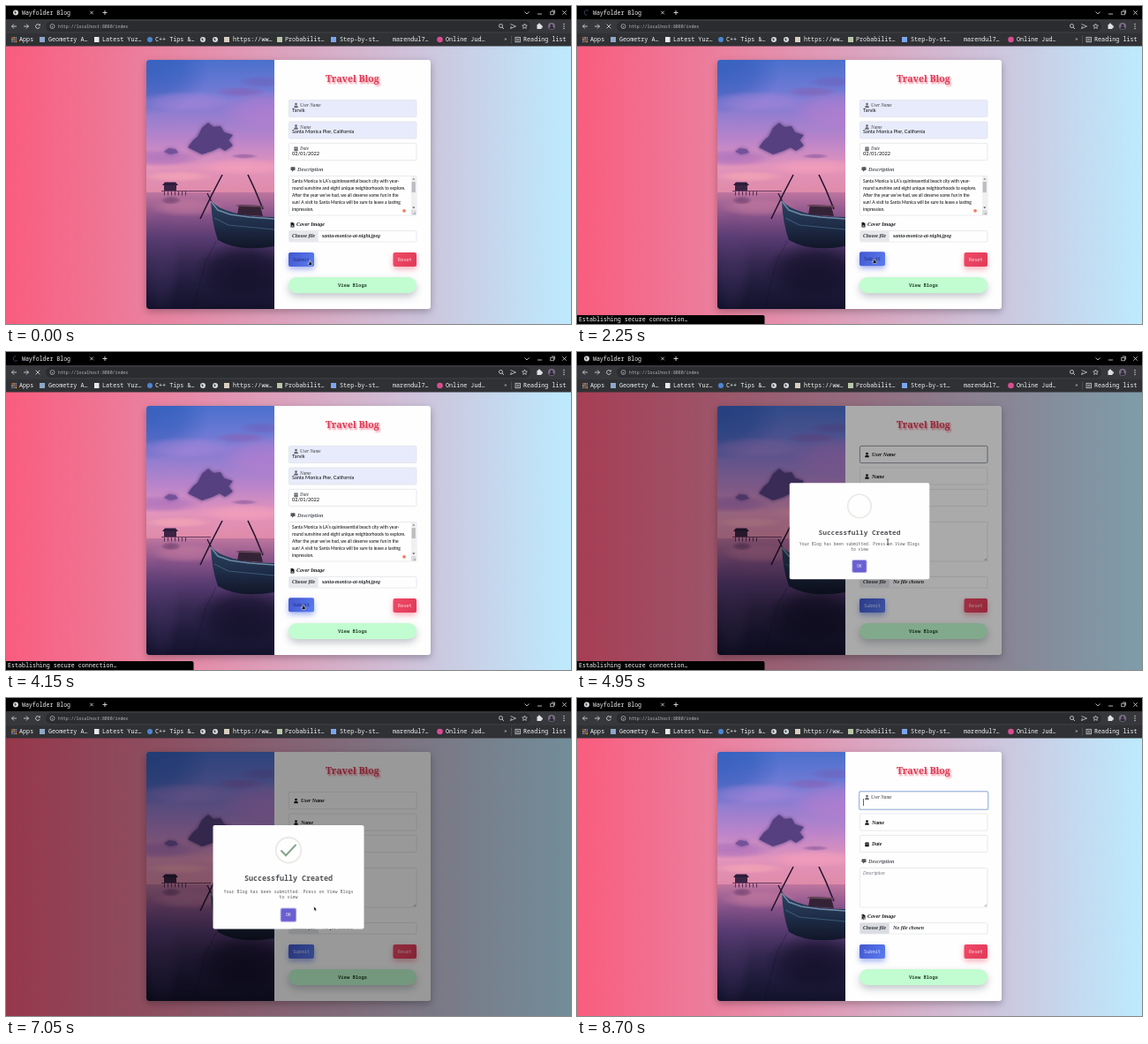
Write an HTML page with a canvas that moves like this. It is 640 px wide and 360 px high and loops after 8750 ms.

```html
<!DOCTYPE html>
<html lang="en">
<head>
<meta charset="utf-8">
<title>Travel Blog form</title>
<style>
html, body { margin: 0; width: 100%; height: 100%; overflow: hidden; background: #000; }
canvas { display: block; width: 640px; height: 360px; }
</style>
</head>
<body>
<canvas id="stage"></canvas>
<script>
const LOOP = 8750, LOAD = 1950, OPEN = 4870, STATUS_END = 5250, CLOSE = 7882, FOCUS = 8220;
const MONO = '"Noto Sans Mono", monospace';
const SCRIPT = '"Liberation Serif", serif';
const SANS = 'Lato, sans-serif';

const canvas = document.getElementById('stage');
const dpr = window.devicePixelRatio || 1;
canvas.width = 640 * dpr;
canvas.height = 360 * dpr;
const g = canvas.getContext('2d');

const clamp = (v, a = 0, b = 1) => Math.min(b, Math.max(a, v));
const part = (t, from, len) => clamp((t - from) / len);
const lerp = (a, b, k) => a + (b - a) * k;
const ease = k => k * k * (3 - 2 * k);

function rect(x, y, w, h, fill) {
  g.fillStyle = fill;
  g.fillRect(x, y, w, h);
}
function box(x, y, w, h, r, fill, line, lw = 0.7) {
  g.beginPath();
  g.roundRect(x, y, w, h, r);
  if (fill) { g.fillStyle = fill; g.fill(); }
  if (line) { g.strokeStyle = line; g.lineWidth = lw; g.stroke(); }
}
function dot(x, y, r, fill) {
  g.beginPath();
  g.arc(x, y, r, 0, 7);
  g.fillStyle = fill;
  g.fill();
}
function path(pts, line, lw = 1, fill) {
  g.beginPath();
  for (let i = 0; i < pts.length; i += 2) g.lineTo(pts[i], pts[i + 1]);
  if (fill) { g.closePath(); g.fillStyle = fill; g.fill(); }
  if (line) { g.strokeStyle = line; g.lineWidth = lw; g.stroke(); }
}
function arc(x, y, r, a, b, line, lw = 1) {
  g.beginPath();
  g.arc(x, y, r, a, b);
  g.strokeStyle = line;
  g.lineWidth = lw;
  g.stroke();
}
function text(s, x, y, font, fill, align = 'left') {
  g.font = font;
  g.fillStyle = fill;
  g.textAlign = align;
  g.textBaseline = 'middle';
  g.fillText(s, x, y);
}
function grad(x0, y0, x1, y1, ...stops) {
  const gr = g.createLinearGradient(x0, y0, x1, y1);
  stops.forEach((c, i) => gr.addColorStop(i / (stops.length - 1), c));
  return gr;
}
function shadow(color, blur, dy, draw) {
  g.save();
  g.shadowColor = color;
  g.shadowBlur = blur * dpr;
  g.shadowOffsetY = dy * dpr;
  draw();
  g.restore();
}
function haze(x, y, rx, ry, rgb, alpha) {
  g.save();
  g.translate(x, y);
  g.scale(rx, ry);
  const gr = g.createRadialGradient(0, 0, 0, 0, 0, 1);
  gr.addColorStop(0, `rgba(${rgb},${alpha})`);
  gr.addColorStop(0.55, `rgba(${rgb},${alpha * 0.75})`);
  gr.addColorStop(1, `rgba(${rgb},0)`);
  dot(0, 0, 1, gr);
  g.restore();
}
function cloud(pts, color) {
  shadow(color, 4, 0, () => path(pts, null, 0, color));
}

function drawBrowser(t, loading) {
  const pale = '#dfe1e4';
  rect(0, 0, 640, 15, '#000');
  rect(0, 15, 640, 16, '#37383b');
  rect(0, 31, 640, 14.5, '#303134');
  box(45, 17, 549, 12, 6, '#2b2c2f');

  if (loading) {
    const a = t / 160;
    arc(11, 7.5, 2.8, a, a + 4, '#34405a', 1);
  } else {
    globe(11, 7.5);
  }
  text('Wayfolder Blog', 18, 7.8, '500 6.55px ' + MONO, '#f2f2f2');
  cross(97, 7.5, 1.8, pale);
  path([109.5, 7.5, 114.5, 7.5], pale, 0.9);
  path([112, 5, 112, 10], pale, 0.9);
  path([587.5, 6.5, 590, 9, 592.5, 6.5], pale, 0.8);
  path([602, 9, 607, 9], pale, 0.8);
  g.strokeStyle = pale;
  g.lineWidth = 0.7;
  g.strokeRect(616.8, 6.2, 3.6, 3.6);
  path([618, 5, 621.6, 5, 621.6, 8.6], pale, 0.7);
  cross(632.5, 7.5, 2.2, pale);

  path([12, 23, 6.5, 23], pale, 0.8);
  path([9, 20.5, 6.5, 23, 9, 25.5], pale, 0.8);
  path([20, 23, 25.5, 23], pale, 0.8);
  path([23, 20.5, 25.5, 23, 23, 25.5], pale, 0.8);
  if (loading) {
    cross(36, 23, 2.4, pale);
  } else {
    arc(36, 23, 2.4, 0.3, 5.4, pale, 0.8);
    path([36.6, 22.3, 38.7, 22.3, 38.7, 20.1], null, 0, pale);
  }
  arc(52.5, 23, 2.5, 0, 7, '#bfc2c6', 0.7);
  path([52.5, 22.6, 52.5, 24.5], '#bfc2c6', 0.7);
  text('http://localhost:8080/index', 59, 23.2, '4.9px ' + MONO, '#b4b7bc');
  arc(560.5, 22.5, 2, 0, 7, pale, 0.8);
  path([562, 24, 564, 26], pale, 0.8);
  path([571.5, 20.5, 577.5, 23, 571.5, 25.5, 572.5, 23], pale, 0.7);
  const star = [];
  for (let i = 0; i < 11; i++) {
    const r = i % 2 ? 1.4 : 3, a = i * Math.PI / 5 - Math.PI / 2;
    star.push(587.5 + r * Math.cos(a), 23 + r * Math.sin(a));
  }
  path(star, pale, 0.7);
  rect(601.5, 21, 5, 5, pale);
  dot(604, 20.6, 1.2, pale);
  dot(606.8, 23.5, 1.2, pale);
  dot(618, 23, 4, '#7b6d86');
  dot(618, 22, 1.5, '#2c2735');
  box(615.5, 23.6, 5, 2.6, 1.3, '#2c2735');
  [20.5, 23, 25.5].forEach(y => dot(632, y, 0.7, pale));

  const hues = ['#e06055', '#e8b93f', '#5b9cf0'];
  for (let i = 0; i < 9; i++)
    rect(6.2 + (i % 3) * 2.2, 35.2 + Math.floor(i / 3) * 2.2, 1.5, 1.5, hues[(i + Math.floor(i / 3)) % 3]);
  box(38, 35, 6, 6, 0, '#8da7c9');
  box(100, 35, 5.5, 6, 0, '#e9e9e9');
  dot(163, 38, 3, '#4b86d0');
  globe(223, 38);
  globe(237, 38);
  box(247, 35, 6, 6, 0, '#d9cfc0');
  box(307, 35, 6, 6, 0, '#b9c7a8');
  box(368, 35, 6, 6, 0, '#7ba6ef');
  dot(491.5, 38, 3.3, '#d94d92');
  const marks = [[15, 'Apps'], [48, 'Geometry A…'], [109, 'Latest Yuz…'], [169, 'C++ Tips &…'],
    [257, 'https://ww…'], [316, 'Probabilit…'], [378, 'Step-by-st…'], [438, 'marendul7…'],
    [498, 'Online Jud…'], [586, 'Reading list']];
  marks.forEach(([x, s]) => text(s, x, 38.2, '500 6.75px ' + MONO, '#f2f3f4'));
  text('»', 564, 37.5, '6px ' + MONO, pale);
  rect(572, 33.5, 0.6, 9, '#5d5f64');
  g.strokeStyle = pale;
  g.lineWidth = 0.7;
  g.strokeRect(577, 35.3, 5.5, 5.5);
  path([578.2, 37.3, 581.4, 37.3], pale, 0.7);
  path([578.2, 39, 581.4, 39], pale, 0.7);
}
function globe(x, y) {
  dot(x, y, 3, '#d5d8dc');
  path([x - 1.8, y - 1, x, y - 1.4, x + 0.6, y + 0.6, x - 0.6, y + 1.6], null, 0, '#44474d');
}
function cross(x, y, r, c) {
  path([x - r, y - r, x + r, y + r], c, 0.8);
  path([x + r, y - r, x - r, y + r], c, 0.8);
}

function drawSunset() {
  g.save();
  g.beginPath();
  g.roundRect(159, 61, 145, 282, [3, 0, 0, 3]);
  g.clip();
  rect(159, 61, 145, 152, grad(0, 61, 0, 213, '#4a70cc', '#6b79d4', '#917dd0', '#bb84ca', '#e294bb', '#df8aa8'));
  haze(160, 75, 70, 48, '40,86,180', 0.6);
  haze(300, 118, 60, 24, '200,126,208', 0.5);
  haze(205, 108, 60, 12, '176,136,220', 0.5);
  haze(266, 97, 30, 6, '140,88,172', 0.5);
  haze(290, 86, 28, 7, '112,90,180', 0.5);
  haze(175, 172, 50, 10, '160,104,186', 0.6);
  haze(270, 182, 55, 10, '250,162,186', 0.6);
  haze(195, 193, 40, 6, '250,172,182', 0.6);
  cloud([206, 160, 212, 152, 217, 148, 222, 138, 229, 132, 235, 137, 243, 136, 247, 143, 257, 146,
    252, 152, 257, 158, 248, 164, 242, 160, 234, 164, 222, 168, 214, 164], '#56407f');
  cloud([179, 165, 184, 161, 192, 162, 195, 166, 186, 168], '#74529a');
  haze(270, 170, 16, 3, '128,80,150', 0.6);

  rect(159, 211, 145, 132, grad(0, 211, 0, 343, '#bd759f', '#875389', '#563a70', '#352850', '#1f1b3b', '#13122b'));
  haze(206, 228, 44, 11, '215,134,166', 0.45);
  haze(176, 290, 22, 60, '92,64,124', 0.25);
  haze(270, 300, 58, 34, '16,14,38', 0.75);

  // hut on stilts
  path([177, 203, 180, 199.5, 192, 199.5, 195, 203], null, 0, '#2c1c3c');
  rect(179, 203, 14, 6, '#3b2444');
  rect(176, 209, 56, 0.9, '#56305a');
  for (let x = 179; x < 206; x += 4) rect(x, 210, 0.8, 4.5, '#3b2444');
  haze(187, 220, 12, 5, '80,42,90', 0.5);

  path([245, 191, 233, 214, 220, 241], '#25152f', 1.6);
  path([228, 212, 242, 240], '#25152f', 1.2);
  path([274, 191, 282, 208, 291, 230], '#25152f', 1.6);

  g.beginPath();
  g.moveTo(232, 220);
  g.quadraticCurveTo(246, 238, 304, 239);
  g.lineTo(304, 272);
  g.quadraticCurveTo(264, 279, 240, 265);
  g.quadraticCurveTo(233, 246, 232, 220);
  g.fillStyle = grad(0, 220, 0, 276, '#2b4563', '#1f2d48', '#101426');
  g.fill();
  path([232, 221, 240, 231, 254, 236, 276, 239, 304, 241], '#6f8ba6', 1.5);
  path([236, 240, 252, 248, 304, 253], '#3a5876', 1.2);
  path([262, 236, 264, 225, 288, 226, 291, 238], null, 0, '#342337');
  path([261, 226, 292, 227], '#6d4a5b', 1.3);
  path([238, 266, 226, 290, 212, 343], 'rgba(20,14,36,.5)', 0.7);
  g.restore();
}

function personIcon(x, y, c) {
  dot(x, y - 1.5, 1.4, c);
  box(x - 2.3, y + 0.2, 4.6, 2.4, [1.6, 1.6, 0.4, 0.4], c);
}
function dateIcon(x, y, c) {
  box(x - 2.2, y - 1.8, 4.4, 4.4, 0.5, c);
  rect(x - 1.5, y - 2.6, 0.8, 1.2, c);
  rect(x + 0.7, y - 2.6, 0.8, 1.2, c);
  rect(x - 2.2, y - 0.7, 4.4, 0.4, '#fff');
}
function field(y, label, icon, value, up, fill) {
  box(320.4, y + 0.4, 144.6, 19.2, 1.5, fill, '#dfe1e6');
  const ly = lerp(y + 10.6, y + 6.6, up);
  const c = up > 0.5 ? '#6b6d74' : '#16171a';
  icon(328.5, ly, c);
  text(label, lerp(334, 333, up), ly + 0.2, `italic bold ${lerp(5.8, 5.1, up)}px ${SCRIPT}`, c);
  if (value) text(value, 324, y + 12.2, '5.6px ' + SANS, '#0b0b0d');
}
function button(x, y, w, h, r, fill, glow, label, color, size) {
  shadow(glow, 6, 3, () => box(x, y, w, h, r, fill));
  text(label, x + w / 2, y + h / 2 + 0.2, size + 'px ' + MONO, color, 'center');
}

const STORY = [
  'Santa Monica is LA’s quintessential beach city with year-',
  'round sunshine and eight unique neighborhoods to explore.',
  'After the year we’ve had, we all deserve some fun in the',
  'sun! A visit to Santa Monica will be sure to leave a lasting',
  'impression.'
];

function drawForm(t) {
  const filled = t < OPEN - 20;
  const focus = part(t, FOCUS, 100);
  const hover = t < 4250;
  shadow('rgba(0,0,0,.28)', 9, 3, () => box(159, 61, 322, 282, 3, '#fefefe'));
  drawSunset();

  g.save();
  g.shadowColor = 'rgba(240,60,90,.65)';
  g.shadowBlur = 2 * dpr;
  g.shadowOffsetX = 1.4 * dpr;
  g.shadowOffsetY = 1.6 * dpr;
  text('Travel Blog', 392.3, 82.9, '600 10.6px "Noto Serif", serif', '#dc3a54', 'center');
  g.restore();

  const up = filled ? 1 : 0, tint = filled ? '#e8ebfb' : '#fefefe';
  if (focus > 0) box(319.8, 105.8, 145.8, 20.4, 2, null, `rgba(165,190,228,${focus})`, 1.8);
  field(106, 'User Name', personIcon, filled && 'Tarvik', Math.max(up, focus), tint);
  const settle = filled ? 0 : 1 - part(t, OPEN + 150, 150);
  if (settle > 0) box(320.4, 106.4, 144.6, 19.2, 1.5, null, `rgba(150,155,168,${settle})`, 1);
  field(130.5, 'Name', personIcon, filled && 'Santa Monica Pier, California', up, tint);
  field(155, 'Date', dateIcon, filled && '02/01/2022', up, '#fefefe');
  if (t > FOCUS && (t - FOCUS) % 1000 < 500) rect(324, 114, 0.7, 8, '#222');

  box(322.5, 182.3, 5, 3.8, 0.6, '#55575d');
  path([324, 186, 324, 187.6, 326, 186], null, 0, '#55575d');
  text('Description', 330, 185, 'italic bold 6.2px ' + SCRIPT, '#55575d');
  box(320.4, 192.4, 144.6, 44.6, 1.5, '#fefefe', '#dfe1e6');
  if (filled) {
    STORY.forEach((s, i) => text(s, 324, 198.6 + i * 8, '500 4.93px ' + SANS, '#18191b'));
    rect(459, 193, 5.4, 38, '#f0f0f1');
    rect(459.6, 199, 4.2, 12, '#bcbdc0');
    path([460.3, 196.6, 463.3, 196.6, 461.8, 194.8], null, 0, '#77797d');
    path([460.3, 227.4, 463.3, 227.4, 461.8, 229.2], null, 0, '#44464a');
    rect(459, 231, 5.4, 5.6, '#dcdde0');
    dot(451, 231.8, 1.9, '#ef8069');
  } else {
    text('Description', 324, 198.8, 'italic 5.2px ' + SCRIPT, '#6f7278');
  }
  path([461.5, 236, 464, 233.5], '#777', 0.6);
  path([463, 236, 464, 235], '#777', 0.6);

  path([322.5, 245, 325, 245, 326.5, 246.5, 326.5, 250.5, 322.5, 250.5], null, 0, '#1b1c1f');
  path([323.2, 249.6, 324.3, 248, 325.8, 249.6], null, 0, '#fff');
  text('Cover Image', 329, 247.9, 'italic bold 6px ' + SCRIPT, '#1b1c1f');
  box(320.4, 254.4, 144.6, 12.6, 1.5, '#fefefe', '#dfe1e6');
  box(320.7, 254.7, 33, 12, [1, 0, 0, 1], t > CLOSE + 200 ? '#d9dce1' : '#e6e8ec');
  text('Choose file', 324, 260.8, 'italic bold 5.6px ' + SCRIPT, '#2a2c30');
  text(filled ? 'santa-monica-at-night.jpeg' : 'No file chosen', 358, 260.8, 'italic bold 5.9px ' + SCRIPT, '#2a2c30');

  const lift = hover && t > 600 ? 0.7 : 0;
  button(320, 279 - lift, 29, 16, 2, grad(320, 279, 349, 295, '#4257cf', '#5b7cf0'),
    'rgba(70,100,220,.5)', 'Submit', hover ? '#1f2c78' : '#d5dcff', 5.3);
  button(438.5, 279, 26.5, 16, 2, grad(438, 279, 465, 295, '#f04a68', '#e03a58'),
    'rgba(230,60,90,.4)', 'Reset', '#ffd9df', 5.3);
  shadow('rgba(120,130,140,.45)', 8, 4, () => box(320, 307, 145, 18, 9, '#c1fdd0'));
  text('View Blogs', 392.5, 316.2, 'bold 5.5px ' + MONO, '#28482f', 'center');
}

// pop-in overshoots, then settles
function popScale(k) {
  if (k < 0.45) return lerp(0.7, 1.05, ease(k / 0.45));
  if (k < 0.8) return lerp(1.05, 0.95, ease((k - 0.45) / 0.35));
  return lerp(0.95, 1, ease((k - 0.8) / 0.2));
}

function drawModal(t) {
  const fade = part(t, OPEN - 40, 145) * (1 - part(t, CLOSE - 10, 160));
  if (fade > 0) rect(0, 45, 640, 315, `rgba(0,0,0,${0.4 * fade})`);
  const out = part(t, CLOSE, 160);
  if (t < OPEN || out >= 1) return;
  const scale = popScale(part(t, OPEN, 300)) * (1 - 0.5 * out);
  g.save();
  g.globalAlpha = 1 - out;
  g.translate(320, 202.7);
  g.scale(scale, scale);
  g.translate(-320, -202.7);
  box(234.5, 144, 171, 117.5, 2, '#fefefe');
  arc(320, 172.3, 14.3, 0, 7, '#ece8e5', 1.8);
  const k = part(t, OPEN + 250, 350);
  if (k > 0) {
    const a = clamp(k / 0.35), b = part(k, 0.35, 0.65);
    g.lineCap = 'round';
    const tick = [312, 173, 312 + 5 * a, 173 + 5.2 * a];
    if (b > 0) tick.push(317 + 11 * b, 178.2 - 11.7 * b);
    path(tick, '#86a48d', 2);
    g.lineCap = 'butt';
  }
  text('Successfully Created', 320, 204.5, '600 8.35px ' + MONO, '#505256', 'center');
  text('Your Blog has been submitted. Press on View Blogs', 320, 219.2, '5px ' + MONO, '#5d5f63', 'center');
  text('to view', 320, 225.3, '5px ' + MONO, '#5d5f63', 'center');
  // the button dims once pressed
  if (out > 0) g.globalAlpha *= 0.5;
  box(310.6, 237.6, 18.6, 16.2, 2, '#b9b3ec');
  box(311.6, 238.6, 16.6, 14.2, 1.5, '#6a5fd0');
  text('OK', 320, 246, '5px ' + MONO, '#f0eeff', 'center');
  g.restore();
}

const MOVES = [[0, 344, 289], [50, 344, 289], [900, 336.5, 287], [4150, 336.5, 287],
  [4850, 352, 215], [5450, 352, 215], [6000, 348.8, 236], [7200, 348.8, 236], [7750, 322.6, 246]];

function drawCursor(t) {
  let i = MOVES.length - 1;
  while (MOVES[i][0] > t) i--;
  const a = MOVES[i], b = MOVES[i + 1] || a;
  const k = b === a ? 0 : ease((t - a[0]) / (b[0] - a[0]));
  const x = lerp(a[1], b[1], k), y = lerp(a[2], b[2], k);
  g.save();
  g.translate(x, y);
  if (t < 4250) {
    path([-0.6, -1, 0.6, -1, 0.7, 1, 2.6, 1.6, 2.4, 4.6, -0.8, 4.6, -2, 2.2, -0.6, 2.4], '#fff', 0.5, '#0a0a0a');
  } else if (t > 4700 && t < 5500) {
    path([-1.3, -3, 1.3, -3], '#111', 0.7);
    path([0, -3, 0, 3], '#111', 0.7);
    path([-1.3, 3, 1.3, 3], '#111', 0.7);
  } else {
    path([0, 0, 0, 4.8, 1.1, 3.9, 1.9, 5.5, 2.7, 5.1, 2, 3.6, 3.4, 3.5], '#fff', 0.5, '#0a0a0a');
  }
  g.restore();
}

function draw(t) {
  g.setTransform(dpr, 0, 0, dpr, 0, 0);
  rect(0, 45, 640, 315, grad(0, 0, 640, 0, '#fa5c7e', '#bdeafe'));
  drawForm(t);
  drawModal(t);
  drawBrowser(t, t >= LOAD && t < OPEN - 60);
  if (t >= LOAD && t < STATUS_END) {
    box(0, 350, 212.5, 10, [0, 2, 0, 0], '#020202');
    text('Establishing secure connection…', 2, 355.4, '500 6.65px ' + MONO, '#f6f6f6');
  }
  drawCursor(t);
}

function tick() {
  draw(performance.now() % LOOP);
  requestAnimationFrame(tick);
}
tick();
</script>
</body>
</html>
```
